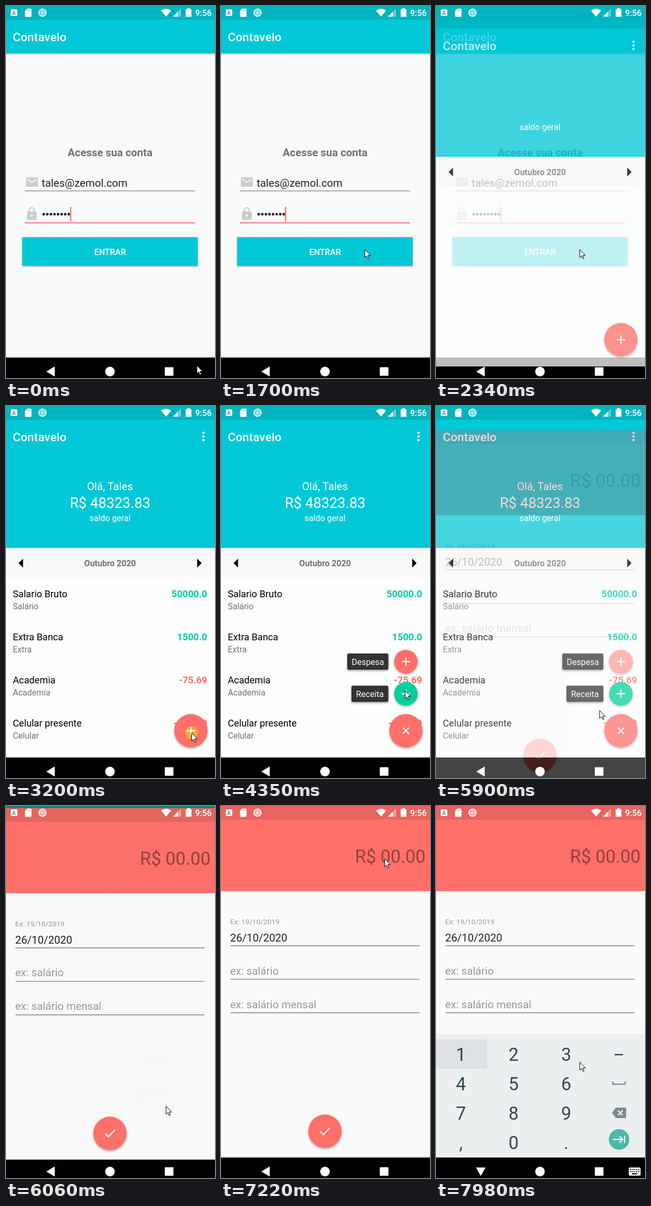
Write an HTML page that moves like this. It is 399 px wide and 708 px high and loops after 8 s.

```html
<!DOCTYPE html>
<html lang="pt">
<head>
<meta charset="utf-8">
<title>Finanças</title>
<style>
  html, body { margin: 0; width: 100%; height: 100%; overflow: hidden; background: #000; }
  svg { display: block; width: 100vw; height: 100vh; font-family: Roboto, sans-serif; }
  text { white-space: pre; }
  .mid { text-anchor: middle; }
  .end { text-anchor: end; }
  .bold { font-weight: 700; }
  .medium { font-weight: 500; }
  .s12 { font-size: 13.7px; }
  .s14 { font-size: 16px; }
  .s16 { font-size: 18.2px; }
  .s18 { font-size: 20.5px; }
  .s20 { font-size: 22.8px; }
  .s24 { font-size: 27.4px; }
  .s30 { font-size: 34.2px; }
  .teal { fill: #00c8d6; }
  .tealDark { fill: #00b3bf; }
  .coral { fill: #ff7069; }
  .coralDark { fill: #e8645e; }
  .green { fill: #00d09c; }
  .white { fill: #fff; }
  .gray { fill: #717171; }
  .hint { fill: #999; }
  .line { fill: none; stroke: #fff; stroke-width: 2.2; }
  .rule { stroke: #7d7d7d; stroke-width: 1.3; }
  .raised { filter: drop-shadow(0 2px 2px rgba(0, 0, 0, .35)); }
  .bar { filter: drop-shadow(0 1px 1.5px rgba(0, 0, 0, .4)); }
</style>
</head>
<body>
<svg viewBox="0 0 399 708" preserveAspectRatio="none">
  <defs>
    <clipPath id="buttonClip"><rect x="31" y="440" width="335" height="54.5"/></clipPath>
    <clipPath id="fabClip"><circle cx="353" cy="618" r="31.7"/></clipPath>
    <clipPath id="aboveNav"><rect width="399" height="669"/></clipPath>
    <path id="plus" class="line" d="M-8 0H8M0-8V8"/>
  </defs>

  <g id="login">
    <rect width="399" height="708" fill="#f9fbfa"/>
    <rect y="26" width="399" height="64" class="teal bar"/>
    <rect width="399" height="26" class="tealDark"/>
    <text x="13" y="67" class="white medium s20">Contavelo</text>
    <text x="198.7" y="286" class="mid bold gray" font-size="20.4">Acesse sua conta</text>
    <path fill="#ccc" fill-rule="evenodd" d="M40 326H59Q61 326 61 328V342Q61 344 59 344H40Q38 344 38 342V328Q38 326 40 326ZM40 328.5V330.8L49.5 336.8 59 330.8V328.5L49.5 334.5Z"/>
    <text x="68" y="343.5" class="s18" fill="#212121">tales@zemol.com</text>
    <path class="rule" d="M36 351.8H361"/>
    <path fill="none" stroke="#ccc" stroke-width="2.2" d="M44.5 392V388.5A4.7 4.7 0 0 1 53.9 388.5V392"/>
    <path fill="#ccc" fill-rule="evenodd" d="M42 391H56.5Q58.5 391 58.5 393V405Q58.5 407 56.5 407H42Q40 407 40 405V393Q40 391 42 391ZM49.2 396.7A2.3 2.3 0 1 0 49.3 396.7Z"/>
    <g id="dots" fill="#212121"></g>
    <rect id="caret" x="122.2" y="382" width="2.4" height="28" class="coral"/>
    <rect x="36" y="411.7" width="325" height="2" class="coral"/>
    <rect id="button" x="31" y="440" width="335" height="54.5" class="teal"/>
    <circle id="buttonRipple" cx="274" cy="463" class="white" clip-path="url(#buttonClip)"/>
    <text x="198.7" y="473.7" class="mid white medium s14">ENTRAR</text>
    <rect y="669" width="399" height="39"/>
  </g>

  <g id="main">
    <rect width="399" height="708" fill="#fefefe"/>
    <rect width="399" height="270.5" class="teal"/>
    <rect width="399" height="26" class="tealDark"/>
    <text x="13" y="67" class="white medium s20">Contavelo</text>
    <g class="white"><circle cx="377" cy="51" r="2.3"/><circle cx="377" cy="58" r="2.3"/><circle cx="377" cy="65" r="2.3"/></g>
    <text x="198.5" y="218.5" class="mid white s14">saldo geral</text>
    <rect y="270.5" width="399" height="55.5" fill="#f9f9f9"/>
    <path d="M24 299L32.5 290.5V307.5ZM373.5 299L365 290.5V307.5Z"/>
    <text x="198.7" y="305" class="mid bold gray s14">Outubro 2020</text>
    <g id="data">
      <text x="198.5" y="159.5" class="mid white s18">Olá, Tales</text>
      <text x="198.7" y="194" class="mid white s24">R$ 48323.83</text>
      <g id="rows"></g>
    </g>
    <g id="options"></g>
    <circle cx="353" cy="618" r="31.7" class="coral raised"/>
    <circle id="fabRipple" cx="354" cy="622" fill="#ffa83c" clip-path="url(#fabClip)"/>
    <use id="fabIcon" href="#plus"/>
    <rect y="669" width="399" height="39"/>
    <rect id="dim" width="399" height="708"/>
  </g>

  <g id="form">
    <rect width="399" height="708" fill="#fafafa"/>
    <rect width="399" height="162" class="coral"/>
    <rect width="399" height="26" class="coralDark"/>
    <text x="390.5" y="108" class="end s30" fill="#000" fill-opacity=".42">R$ 00.00</text>
    <text x="17.5" y="225" class="hint s12">Ex: 19/10/2019</text>
    <text x="17.5" y="258" class="s18" fill="#212121">26/10/2020</text>
    <text x="17.5" y="320.5" class="hint s18">ex: salário</text>
    <text x="17.5" y="384.5" class="hint s18">ex: salário mensal</text>
    <path class="rule" d="M18 266H379M18 329.7H379M18 393.5H379"/>
    <circle cx="198.5" cy="619" r="31.7" class="coral raised"/>
    <path class="line" d="M189.5 619.5L195.5 625.5 208 612.5"/>
    <rect y="669" width="399" height="39"/>
  </g>

  <g clip-path="url(#aboveNav)">
    <g id="keyboard">
      <rect y="434" width="399" height="235" fill="#eceff0"/>
      <rect y="444" width="98" height="56" fill="#dde1e3"/>
      <g id="keys" class="mid s30" fill="#37474f"></g>
      <rect x="341" y="472" width="16" height="2.5" fill="#37474f"/>
      <path d="M337.5 524V529.5H361V524" fill="none" stroke="#84919a" stroke-width="2.4"/>
      <path d="M336 584L343.5 574H361Q363 574 363 576V592Q363 594 361 594H343.5Z" fill="#7d8a91"/>
      <path class="line" d="M347.5 579.5L356.5 588.5M356.5 579.5L347.5 588.5"/>
      <circle cx="349.5" cy="634.7" r="19.6" fill="#4db6ac"/>
      <path class="line" d="M338 634.7H356M350.5 628.7L356.5 634.7 350.5 640.7M360 628V641.5"/>
    </g>
  </g>

  <g class="white">
    <rect x="9" y="6.5" width="12.5" height="12.5" rx="1.5"/>
    <text x="15.2" y="16.6" class="mid bold" font-size="10.5" fill="#6d8f93">A</text>
    <path d="M40.5 5H47Q48.7 5 48.7 6.7V19Q48.7 20.7 47 20.7H38Q36.3 20.7 36.3 19V9.2Z"/>
    <path d="M41.5 7.5V10M44 7.5V10M46.5 7.5V10" stroke="#8fb8bc" stroke-width="1.2"/>
    <circle cx="69.7" cy="12.7" r="6.8" fill-opacity=".35" stroke="#fff" stroke-width="1.9"/>
    <circle cx="69.7" cy="12.7" r="4" fill-opacity=".4"/>
    <path d="M296 8.7Q305.5 2 315.3 8.7L305.7 20.3Z"/>
    <path d="M318.7 20.3L334 5V20.3Z" fill-opacity=".4"/>
    <path d="M318.7 20.3L328 11V20.3Z"/>
    <path d="M346 4H351V6H354V20.5H343V6H346Z"/>
    <text x="392.5" y="19" class="end medium s14">9:56</text>
    <path id="back" d="M77 695.7L93 686V705.3Z"/>
    <path id="hide" d="M76.5 688H94.5L85.5 704.3Z"/>
    <circle cx="198.5" cy="695.7" r="9.2"/>
    <rect x="303.2" y="687.5" width="16.5" height="16.3" rx="1"/>
    <g id="switcher">
      <rect x="368" y="688" width="22.5" height="15.5" rx="2"/>
      <path d="M371 692H388M371 696H388" stroke="#000" stroke-width="2" stroke-dasharray="2 1.75"/>
      <path d="M374 700H384.5" stroke="#000" stroke-width="2"/>
    </g>
  </g>
  <path id="cursor" class="white" stroke="#000" stroke-width="1" stroke-linejoin="round" d="M.5.5V15.6L4 12.4 6.4 18 8.7 17 6.3 11.6H11.2Z"/>
</svg>

<script>
const LOOP = 8000, STEP = 76.92;
const BURSTS = [0, 2240, 3040, 5130];
const MAIN_OPENS = 2240, FORM_OPENS = 5899;

const $ = id => document.getElementById(id);
const fill = (id, items, draw) => { $(id).innerHTML = items.map(draw).join(''); };

fill('dots', [...Array(8).keys()], i => `<circle cx="${72 + i * 6.85}" cy="396.3" r="2.5"/>`);

fill('rows', [
  ['Salario Bruto', 'Salário', '50000.0'],
  ['Extra Banca', 'Extra', '1500.0'],
  ['Academia', 'Academia', '-75.69'],
  ['Celular presente', 'Celular', '-899.99']
], ([name, kind, value], i) => `<g transform="translate(0 ${i * 82})">
  <text x="13" y="364" class="s16">${name}</text>
  <text x="13" y="386.5" class="gray s14">${kind}</text>
  <text x="384" y="364" class="end bold s16 ${value < 0 ? 'coral' : 'green'}">${value}</text></g>`);

fill('options', [['Despesa', 486.5, 241, 'coral'], ['Receita', 547.7, 249, 'green']],
  ([name, y, left, color]) => `<g id="label${name}">
    <rect x="${left}" y="${y - 15.5}" width="${319.5 - left}" height="31" rx="3" fill="#333" class="raised"/>
    <text x="${(left + 319.5) / 2}" y="${y + 6.5}" class="mid white s14">${name}</text></g>
  <g transform="translate(353 ${y})"><g id="fab${name}">
    <circle r="22.5" class="${color} raised"/>
    <circle id="ripple${name}" r="0" class="white" opacity=".32"/>
    <use href="#plus"/></g></g>`);

fill('keys', [...'123456789,0.'], (key, i) =>
  `<text x="${47.5 + i % 3 * 100.5}" y="${485 + Math.floor(i / 3) * 56}">${key}</text>`);

// Each track row: time, then values interpolated linearly.
const tracks = {
  cursor: [[0, 364, 684], [77, 350, 640], [154, 318, 555], [231, 290, 480], [308, 279, 441],
    [385, 279, 441], [461, 274, 457], [1220, 274, 457], [1384, 274, 463], [2317, 274, 463],
    [2810, 352, 618], [3040, 352, 618], [3117, 354, 622], [4040, 354, 622], [4348, 351, 541],
    [4655, 350, 497], [4732, 349, 495], [5361, 349, 495], [5745, 318, 586], [5899, 312, 579],
    [6053, 305, 571], [6207, 305, 480], [6590, 312, 100], [7361, 312, 100], [7590, 305, 185],
    [7976, 274, 487]],
  open: [[-77, 57, 0], [0, 46, .27], [77, 17, .75], [154, 4, .99], [231, 1, 1], [308, 0, 1]],
  dim: [[5899, 0], [6053, .25]],
  buttonRipple: [[600, 0, .22], [850, 260, .22], [1062, 300, 0]],
  buttonLift: [[600, 1], [700, 3], [950, 3], [1062, 1]],
  fabRipple: [[3117, 0, .95], [3194, 12, .95], [3348, 44, .9], [3580, 44, 0]],
  fabTurn: [[3271, 0], [3502, -148], [3580, -135]],
  pop: [[0, 0], [150, 1.1], [230, 1]],
  optionRipple: [[5130, 0], [5361, 22.5]],
  keyboard: [[7592, 60, 0], [7669, 36, .4], [7746, 10, .85], [7823, 0, 1]]
};

function at(name, t) {
  const track = tracks[name];
  const next = track.findIndex(row => row[0] > t);
  if (next === 0) return track[0].slice(1);
  if (next < 0) return track[track.length - 1].slice(1);
  const a = track[next - 1], b = track[next];
  const p = (t - a[0]) / (b[0] - a[0]);
  return a.slice(1).map((v, i) => v + (b[i + 1] - v) * p);
}

// The screen refreshes in even steps counted from each burst of activity.
function refreshTime(t) {
  const start = BURSTS.filter(b => b <= t).pop();
  return start + Math.floor((t - start + 12) / STEP) * STEP;
}

const set = (id, attrs) => {
  for (const key in attrs) $(id).setAttribute(key, attrs[key]);
};
const show = (id, on) => set(id, { visibility: on ? 'visible' : 'hidden' });
const slide = (id, [y, opacity]) => {
  set(id, { transform: `translate(0 ${y})`, opacity });
  show(id, opacity > 0);
};
const ripple = (id, [r, opacity]) => set(id, { r, opacity });

function render(now) {
  const t = refreshTime(now);

  const [x, y] = at('cursor', t);
  set('cursor', { transform: `translate(${x} ${y})` });

  show('caret', now < 225 || (now >= 695 && now < 1065) || now >= 1695);
  ripple('buttonRipple', at('buttonRipple', t));
  const [lift] = at('buttonLift', t);
  $('button').style.filter = `drop-shadow(0 ${lift}px 1.5px rgba(0,0,0,.4))`;

  slide('main', at('open', t - MAIN_OPENS));
  slide('form', at('open', t - FORM_OPENS));
  set('data', { display: t >= 2465 ? 'inline' : 'none' });
  set('dim', { opacity: at('dim', t)[0] });

  ripple('fabRipple', at('fabRipple', t));
  set('fabIcon', { transform: `translate(353 618) rotate(${at('fabTurn', t)[0]})` });
  [['Receita', 3340], ['Despesa', 3420]].forEach(([name, start]) => {
    const [scale] = at('pop', t - start);
    const reveal = Math.min(scale, 1);
    set('fab' + name, { transform: `scale(${scale})` });
    set('label' + name, { transform: `translate(${(1 - reveal) * 30} 0)`, opacity: reveal });
  });
  set('rippleDespesa', { r: at('optionRipple', t)[0] });

  const typing = t >= 7510;
  set('back', { display: typing ? 'none' : 'inline' });
  set('hide', { display: typing ? 'inline' : 'none' });
  set('switcher', { display: typing ? 'inline' : 'none' });
  slide('keyboard', at('keyboard', t));
}

function tick() {
  render(performance.now() % LOOP);
  requestAnimationFrame(tick);
}
tick();
</script>
</body>
</html>
```
